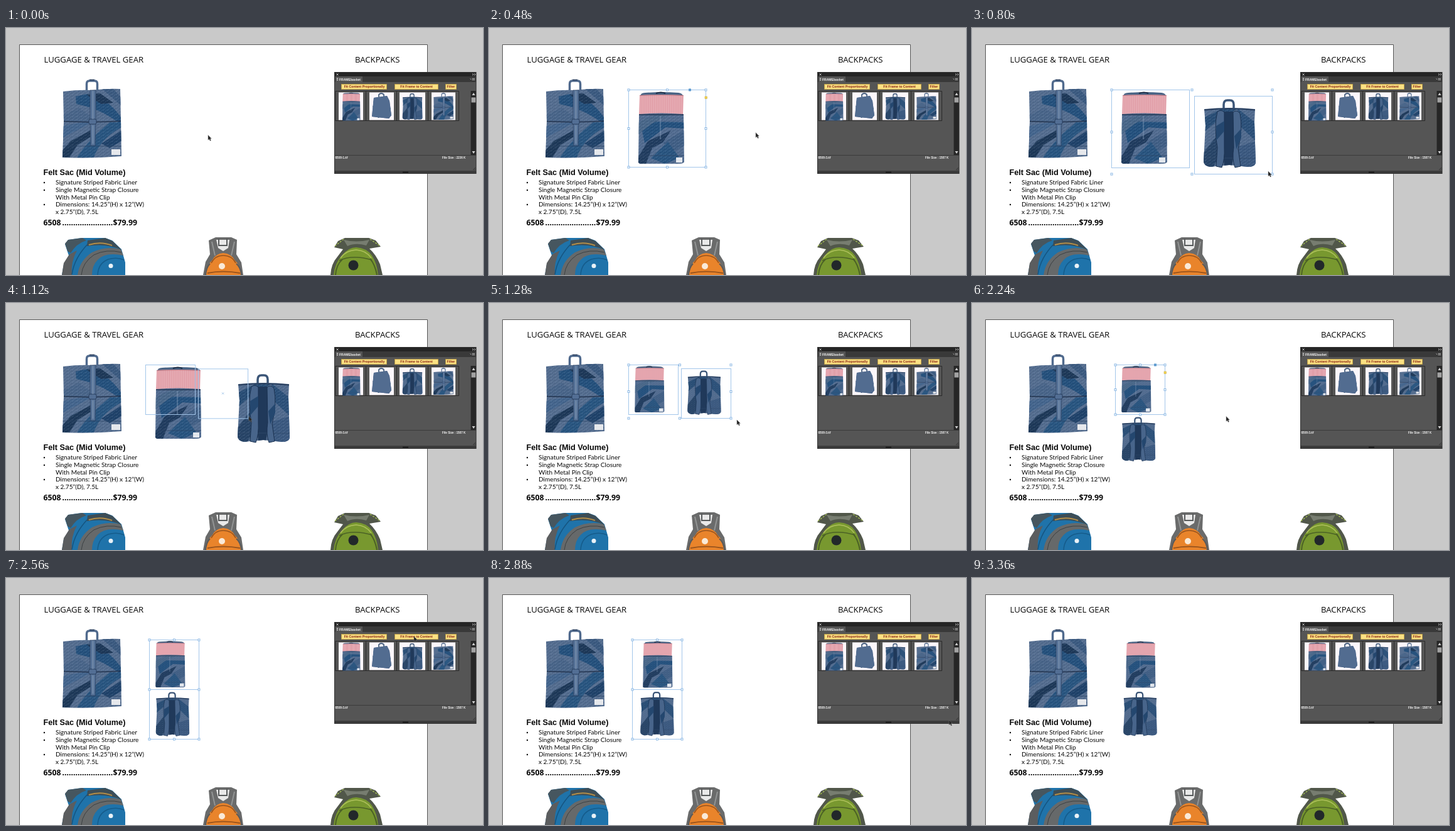
These frames come from a looping animation (760 px wide and 393 px high, 3.84 s). An HTML page:

```html
<!DOCTYPE html>
<html lang="en">
<head>
<meta charset="utf-8">
<title>Catalog layout</title>
<style>
html, body { margin: 0; width: 100%; height: 100%; overflow: hidden; background: #c9c9c9; }
svg { display: block; }
text { fill: #080808; white-space: pre; }
.head { font: 500 13.15px "Open Sans", sans-serif; }
.title { font: bold 12.7px "Liberation Sans", sans-serif; }
.body { font: 10.1px Lato, sans-serif; }
.price { font: bold 12.3px "Open Sans", sans-serif; }
.panel text { font: bold 4.6px "Liberation Sans", sans-serif; fill: #f2f2f2; }
.panel .tab { font-size: 5.05px; }
.panel .btn text { font-size: 5.25px; fill: #8a2412; text-anchor: middle; }
.btn rect { fill: #fbe183; stroke: #c9a23c; stroke-width: .7; }
.line { fill: none; stroke: #a3c6ea; }
.handle { fill: #fff; stroke: #84b3e2; stroke-width: .9; }
.guide { fill: none; stroke: #dcdcdf; }
</style>
</head>
<body>
<svg width="760" height="393" viewBox="0 0 760 393">
<defs>
  <pattern id="weave" width="7" height="5" patternUnits="userSpaceOnUse">
    <path d="M0 .5H2M4 2.500H5M2 4.500H3M5.500 1H6.500" stroke="#c3d0df" opacity=".17"/>
    <path d="M3 1.500H4M0 3.500H1M5 4H6.500" stroke="#10233c" opacity=".2"/>
  </pattern>
  <pattern id="candy" width="3" height="9" patternUnits="userSpaceOnUse">
    <rect width="3" height="9" fill="#e09ba5"/><path d="M1 0V9" stroke="#ecbdc3" stroke-width=".9"/>
  </pattern>
  <path id="cityShape" d="M91 101Q115 98 137 99Q165 96 182 97L183 148L184 204Q137 208 90 206L92 148Z"/>
  <path id="openShape" d="M239 137Q275 134 310 137L311 213Q310 216 302 216H242Q237 216 238 211Z"/>
  <path id="backShape" d="M370 129Q410 125 451 129L450 150L452 215Q450 221 440 221L410 218L379 221Q369 219 369 212L372 155Z"/>
  <clipPath id="cityClip"><use href="#cityShape"/></clipPath>
  <clipPath id="openClip"><use href="#openShape"/></clipPath>
  <clipPath id="backClip"><use href="#backShape"/></clipPath>

  <g id="city">
    <path d="M128.500 101V89Q128.500 84 133 84H141Q145.500 84 145.500 89V101" fill="none" stroke="#506a8d" stroke-width="3.500"/>
    <path d="M133 82.500H141" stroke="#263a58" stroke-width="1.500"/>
    <use href="#cityShape" fill="#546d8f"/>
    <g clip-path="url(#cityClip)">
      <path d="M111 109L128 105Q158 107 184 143V154Q151 128 112 121Z" fill="#24507c"/>
      <path d="M128 106L150 104L171 119L152 121Z" fill="#1d3858"/>
      <path d="M152 96H170L184 111V124Z" fill="#3b5a80"/>
      <path d="M90 139L116 127L136 141V149H90Z" fill="#496589"/>
      <path d="M113 206Q134 174 166 150H184V158Q150 176 140 206Z" fill="#285580"/>
      <path d="M89 196L103 180L138 161V171L114 186L101 206H89Z" fill="#1d3858"/>
      <path d="M90 156L122 150H137L90 175Z" fill="#44658d"/>
      <path d="M152 184L184 163V180L165 191Z" fill="#1f426a"/>
      <use href="#cityShape" fill="url(#weave)"/>
      <path d="M90 148.500Q137 151 184 148" fill="none" stroke="#22334e" stroke-width="1.500"/>
      <path d="M90 188H184" stroke="#314a6b" stroke-width=".8"/>
    </g>
    <path d="M134 99H143V145L142 187H135L134 145Z" fill="#587499" stroke="#2b4262" stroke-width=".8"/>
    <rect x="132" y="145" width="12" height="8" rx="2" fill="#536f95" stroke="#263c5c"/>
    <path d="M138.500 100V145M138.500 155V184" stroke="#91a5be" stroke-width=".8"/>
    <rect x="168" y="193" width="14" height="9" fill="#e6e8ec"/>
  </g>

  <g id="open">
    <path d="M241 109Q241 103 249 103Q275 101 302 103Q309 104 309 109Z" fill="#4a6485"/>
    <path d="M266 104Q274 101 281 104" fill="none" stroke="#1c2c45" stroke-width="2"/>
    <path d="M240 107Q274 105 310 107L309 138H239Z" fill="url(#candy)"/>
    <path d="M240 107.500Q274 105.500 310 107.500" fill="none" stroke="#b9747f"/>
    <use href="#openShape" fill="#526c90"/>
    <g clip-path="url(#openClip)">
      <path d="M244 164L262 149L311 150V160L281 158L248 183Z" fill="#23507d"/>
      <path d="M238 150L266 137H290L260 152L238 169Z" fill="#496789"/>
      <path d="M238 205L253 180L290 163L277 182L260 191L250 216H238Z" fill="#203c5f"/>
      <path d="M277 182L311 163V187L292 198Z" fill="#415f85"/>
      <path d="M258 207L285 181L304 207L280 216Z" fill="#28547f"/>
      <use href="#openShape" fill="url(#weave)"/>
      <path d="M238 138H311" stroke="#243956" stroke-width="1.300"/>
      <path d="M238 203H311" stroke="#314a6b" stroke-width=".8"/>
      <path d="M273 140V177" stroke="#8ca2bf" stroke-width=".8"/>
    </g>
    <rect x="298" y="206" width="10" height="8" fill="#e3e7ed"/>
  </g>

  <g id="back">
    <path d="M401 132V122Q401 115 407 115H411Q417 115 417 122V132" fill="none" stroke="#3b5577" stroke-width="3.500"/>
    <use href="#backShape" fill="#516b8e"/>
    <g clip-path="url(#backClip)">
      <path d="M369 143L399 128H424Q390 146 369 166Z" fill="#284d75"/>
      <path d="M369 198L388 174L402 168V190L384 222H369Z" fill="#274467"/>
      <path d="M423 128L452 151V180L429 158Z" fill="#2b5079"/>
      <path d="M424 189L452 180V222H424Z" fill="#3b5980"/>
      <use href="#backShape" fill="url(#weave)"/>
      <path d="M402 133H416L419 190L414 220H402L399 190Z" fill="#20395a"/>
      <path d="M369 130.500Q410 126 452 130.500" fill="none" stroke="#263c5b" stroke-width="2"/>
      <path d="M369 207H452" stroke="#314a6b" stroke-width=".8"/>
    </g>
    <g fill="#48658b" stroke="#1a3150">
      <path d="M391 133Q397 129 402 134L402 190Q403 209 398 222L389 220L391 190Q385 158 391 133Z"/>
      <path d="M416 134Q422 129 427 136Q432 161 424 192L428 220L419 222Q414 209 417 190Z"/>
    </g>
    <path d="M389 156L402 148V164L389 179ZM418 172L429 160V175L421 193Z" fill="#24476f"/>
  </g>

  <g id="side">
    <path d="M594 111V106Q598 102 602 106V111" fill="none" stroke="#48607f" stroke-width="1.800"/>
    <path id="sideShape" d="M586 111L607 108L611 116L614 139L610 144L583 141Z" fill="#526c90"/>
    <path d="M586 115L609 121L611 129L585 122Z" fill="#28507a"/>
    <path d="M583 139L597 127L606 129L594 143Z" fill="#23456b"/>
    <path d="M584 125L613 128M607 109L610 144" stroke="#29405f" fill="none" stroke-width=".8"/>
    <use href="#sideShape" fill="url(#weave)"/>
  </g>
</defs>

<rect width="760" height="393" fill="#c9c9c9"/>
<path d="M21.500 394V26.500H671.500V394" fill="#fff" stroke="#555"/>
<text class="head" x="60.500" y="54.500">LUGGAGE &amp; TRAVEL GEAR</text>
<text class="head" x="556" y="54.500">BACKPACKS</text>
<use href="#city"/>
<text class="title" x="59.500" y="234">Felt Sac (Mid Volume)</text>
<g class="body">
  <g fill="#111"><circle cx="61" cy="246" r="1.200"/><circle cx="61" cy="258" r="1.200"/><circle cx="61" cy="281" r="1.200"/></g>
  <text x="79" y="249">Signature Striped Fabric Liner</text>
  <text x="79" y="261">Single Magnetic Strap Closure</text>
  <text x="79" y="272.500">With Metal Pin Clip</text>
  <text x="79" y="284">Dimensions: 14.25”(H) x 12”(W)</text>
  <text x="79" y="296">x 2.75”(D), 7.5L</text>
</g>
<g class="price">
  <text x="59.500" y="314">6508</text><text x="89.500" y="314">.......................</text><text x="170.500" y="314">$79.99</text>
</g>

<g id="blueBag">
  <path d="M89 393L92 376L100 362L94 344L99 337L120 334L158 334L169 338L184 352L190 373V393Z" fill="#1f73aa"/>
  <path d="M89 393L92 374L101 360L113 354Q103 372 105 393Z" fill="#5b5d5f"/>
  <path d="M94 343L99 337L122 334L128 338Q112 343 103 358L98 355Z" fill="#46565f"/>
  <path d="M105 392Q109 365 132 342" stroke="#15547f" fill="none" stroke-width="1.500"/>
  <path d="M114 393Q117 370 137 357Q159 346 183 352L187 362Q158 356 146 369Q137 378 137 393Z" fill="#66696a"/>
  <path d="M130 338L158 334L170 339L184 353Q160 342 129 347Z" fill="#3d4d56"/>
  <path d="M132 345Q151 339 169 346" stroke="#b28d48" fill="none" stroke-width="2"/>
  <path d="M120 393Q122 373 140 361Q160 351 184 357" stroke="#3b4043" fill="none"/>
  <path d="M146 393Q147 374 163 368Q177 364 188 369" stroke="#155b8a" fill="none" stroke-width="1.500"/>
  <circle cx="167" cy="378.500" r="3.500" fill="#eaf2f7"/>
</g>
<g id="orangeBag">
  <path d="M314 393L318 372L325 360L323 338L334 333H359L368 337L367 360L375 373L378 393Z" fill="#6a6b6b"/>
  <path d="M335 337H356L354 350L346 355L338 350Z" fill="#e9e9e9"/>
  <path d="M339 335V346H352V335" stroke="#575a5b" fill="none" stroke-width="2"/>
  <path d="M328 340L333 362M364 340L359 362" stroke="#929494" stroke-width="2"/>
  <path d="M318 393Q320 377 329 369Q334 359 346 358Q359 359 364 369Q373 377 375 393Z" fill="#e9842b"/>
  <path d="M327 374Q333 362 346 362Q360 362 366 374" stroke="#9a551e" fill="none" stroke-width="1.500"/>
  <path d="M321 390Q346 385 373 390" stroke="#9a551e" fill="none" stroke-width="2"/>
  <path d="M318 393Q319 381 325 375M375 393Q374 381 367 375" stroke="#58595a" fill="none" stroke-width="2"/>
  <circle cx="344" cy="379" r="5" fill="#faead8"/>
</g>
<g id="greenBag">
  <path d="M517 393Q518 375 528 364L537 352L523 349L529 339L540 334H578L589 338L597 348L579 351Q590 361 596 376L600 393Z" fill="#51574a"/>
  <path d="M524 347L538 336M580 336L595 346" stroke="#9fb852" stroke-width="1.500" stroke-dasharray="3 2"/>
  <path d="M538 337Q558 342 579 337L574 346Q557 341 544 347Z" fill="#777d70"/>
  <path d="M522 393Q524 373 536 361Q546 349 558 349Q575 350 583 362Q591 374 593 393Z" fill="#78982f"/>
  <path d="M533 366Q541 354 558 353Q574 354 582 366" stroke="#adc05a" fill="none" stroke-width="1.500"/>
  <path d="M531 370Q552 360 583 369" stroke="#4b6126" fill="none" stroke-width="1.500"/>
  <path d="M525 393Q526 377 536 368M591 393Q588 376 580 367" stroke="#4b6126" fill="none" stroke-width="2"/>
  <circle cx="553.500" cy="377.500" r="8" fill="#22282a"/>
</g>

<g class="panel">
  <rect x="524" y="70" width="225" height="162" fill="#555"/>
  <rect x="524" y="70" width="225" height="8" fill="#252525"/>
  <rect x="524" y="77" width="225" height="9" fill="#393939"/>
  <rect x="525" y="77" width="43" height="10" fill="#555"/>
  <path d="M526.500 72.500L529.500 75.500M529.500 72.500L526.500 75.500M743 72.500L745 74L743 75.500M746 72.500L748 74L746 75.500M742.500 80.500H747M742.500 82.500H747M739.500 80.500L741 82" stroke="#d4d4d4" fill="none" stroke-width=".8"/>
  <path d="M526.500 81L528 79L529.500 81M526.500 82L528 84L529.500 82" fill="#ddd"/>
  <text class="tab" x="531" y="83.500">FRAMEbasket</text>
  <g class="btn">
    <rect x="534.500" y="89.500" width="72" height="8"/><text x="571" y="95.300">Fit Content Proportionally</text>
    <rect x="619.500" y="89.500" width="69" height="8"/><text x="654" y="95.300">Fit Frame to Content</text>
    <rect x="700.500" y="89.500" width="17" height="8"/><text x="709" y="95.300">Filter</text>
  </g>
  <path d="M525 100.500H721.500V147.500H525V100.500M573.500 101V147M622.500 101V147M672.500 101V147" fill="none" stroke="#292929"/>
  <path d="M530 102.500H569V146.500H530ZM579 102.500H618V146.500H579ZM627 102.500H668V146.500H627ZM678 102.500H716V146.500H678Z" fill="#fbf6fa"/>
  <use href="#open" transform="translate(536 103) scale(.39) translate(-238 -102)"/>
  <use href="#side"/>
  <use href="#back" transform="translate(632 104) scale(.385) translate(-370 -113)"/>
  <use href="#city" transform="translate(681 103.500) scale(.34) translate(-90 -82)"/>
  <rect x="740.500" y="100" width="8.500" height="102" fill="#262626"/>
  <rect x="741.500" y="110.500" width="7" height="8" fill="#a3a3a3"/>
  <path d="M742.500 107L745 103L747.500 107ZM742.500 196L745 200L747.500 196Z" fill="#d0d0d0"/>
  <path d="M524 202.500H749" stroke="#3a3a3a"/>
  <text id="file" x="524.500" y="207.500"></text>
  <text id="size" x="695" y="207.500"></text>
  <rect x="524" y="227" width="225" height="5" fill="#3b3b3b"/>
  <path d="M632 229.500H641" stroke="#111" stroke-width="1.500"/>
  <path d="M744 226L748 222M746 226.500L748.500 224" stroke="#333"/>
  <rect x="523.500" y="70.500" width="225.500" height="161" fill="none" stroke="#303030"/>
</g>

<use id="bag1" href="#open"/>
<use id="bag2" href="#back"/>
<g id="marks"></g>
<path id="cursor" d="M0 0V7.700L1.800 6.200L3.200 9L4.500 8.400L3.200 5.700L5.300 5.400Z" fill="#222" stroke="#777" stroke-width=".5"/>
</svg>

<script>
const LOOP = 3840, SMALL = .645;
const $ = id => document.getElementById(id);

const box = (x, y, w, h = w) =>
  `<rect class="line" x="${x + .5}" y="${y + .5}" width="${w}" height="${h}"/>`;
const dot = (x, y) =>
  `<rect class="handle" x="${x - 1}" y="${y - 1}" width="3" height="3"/>`;
const handles = (x, y, w, h) => [0, .5, 1].flatMap(u => [0, .5, 1].map(v =>
  u === .5 && v === .5 ? '' : dot(x + u * w, y + v * h))).join('');
const selected = (x, y, w, h = w) => box(x, y, w, h) + handles(x, y, w, h);
const single = (x, y, w, link) => selected(x, y, w) +
  `<rect x="${x + link}" y="${y - 1.5}" width="4" height="4" fill="#5d9ace"/>` +
  `<rect x="${x + w - 1}" y="${y + 11}" width="3.500" height="3.500" fill="#f4d34d" stroke="#c9ac45" stroke-width=".6"/>`;
const cross = (x, y) =>
  `<path class="line" d="M${x - 1.5} ${y - 1.5}l3 3m0 -3l-3 3"/>`;

// Both frames shrinking towards the upper left corner
const shrink = s => box(222, 98, 124 * s) +
  box(222 + 132 * s, 98 + 10 * s, 124 * s) + cross(222 + 194 * s, 98 + 72 * s);
const guides = '<path class="guide" d="M60 216.500H307M268.500 178V390"/>';

const first = single(222, 98, 123, 96);
const pair = box(222, 98, 124) + box(354, 108, 124) + handles(222, 98, 256, 134);
const smallPair = box(222, 98, 79) + box(306, 104, 79) + handles(222, 98, 163, 85);
const stack = box(228, 98, 79) + selected(228, 98, 79, 158);

const big1 = [222, 98, 1], big2 = [354, 108, 1];
const small1 = [222, 98, SMALL], small2 = [306.500, 104, SMALL];
const left1 = [228, 98, SMALL], left2 = [229, 178, SMALL];
const mid1 = [235, 98.500, SMALL], mid2 = [231.500, 177.500, SMALL];

// start, pointer, marks, open bag, back bag
const steps = [
  [0, [322, 170.500], ''],
  [160, [324, 156], first, big1],
  [320, [637, 133], first, big1],
  [480, [425, 166.500], first, big1],
  [640, [449, 198], pair, big1, big2],
  [800, [472, 228], pair, big1, big2],
  [960, [430, 205], shrink(.82), big1, big2],
  [1120, [387, 180.500], shrink(.637), big1, big2],
  [1280, [395, 186], smallPair, small1, small2],
  [1440, [343, 182], box(280, 132, 79), small1, small2],
  [1600, [293, 224], guides + box(229, 178, 79), small1, small2],
  [1760, [291, 223.500], guides + box(228, 177, 79), small1, small2],
  [1920, [291, 223.500], single(228, 177, 79, 62), small1, left2],
  [2080, [262, 140], box(228, 98, 79), small1, left2],
  [2240, [405, 180.500], single(228, 98, 79, 62), left1, left2],
  [2400, [645, 92], stack, left1, left2],
  [2560, [650, 93], stack, left1, left2],
  [2720, [650, 93], stack, mid1, mid2],
  [2880, [733, 226], stack, mid1, mid2],
  [3040, [602, 286], stack, mid1, mid2],
  [3200, null, '', mid1, mid2]
];

function place(id, pose, ox = 0, oy = 0) {
  const el = $(id);
  el.style.display = pose ? '' : 'none';
  if (!pose) return;
  const [x, y, s = 1] = pose;
  el.setAttribute('transform', `translate(${x} ${y}) scale(${s}) translate(${-ox} ${-oy})`);
}

let current;
function draw() {
  const t = performance.now() % LOOP;
  const step = steps.findLast(s => s[0] <= t);
  if (step !== current) {
    current = step;
    const [start, pointer, marks, bag1, bag2] = step;
    place('bag1', bag1, 222, 98);
    place('bag2', bag2, 354, 108);
    place('cursor', pointer);
    $('marks').innerHTML = marks;
    $('file').textContent = start < 480 ? '6508-1.tif' : '6508-3.tif';
    $('size').textContent = `File Size : ${start < 480 ? 2236 : 1587} K`;
  }
  requestAnimationFrame(draw);
}
draw();
</script>
</body>
</html>
```
